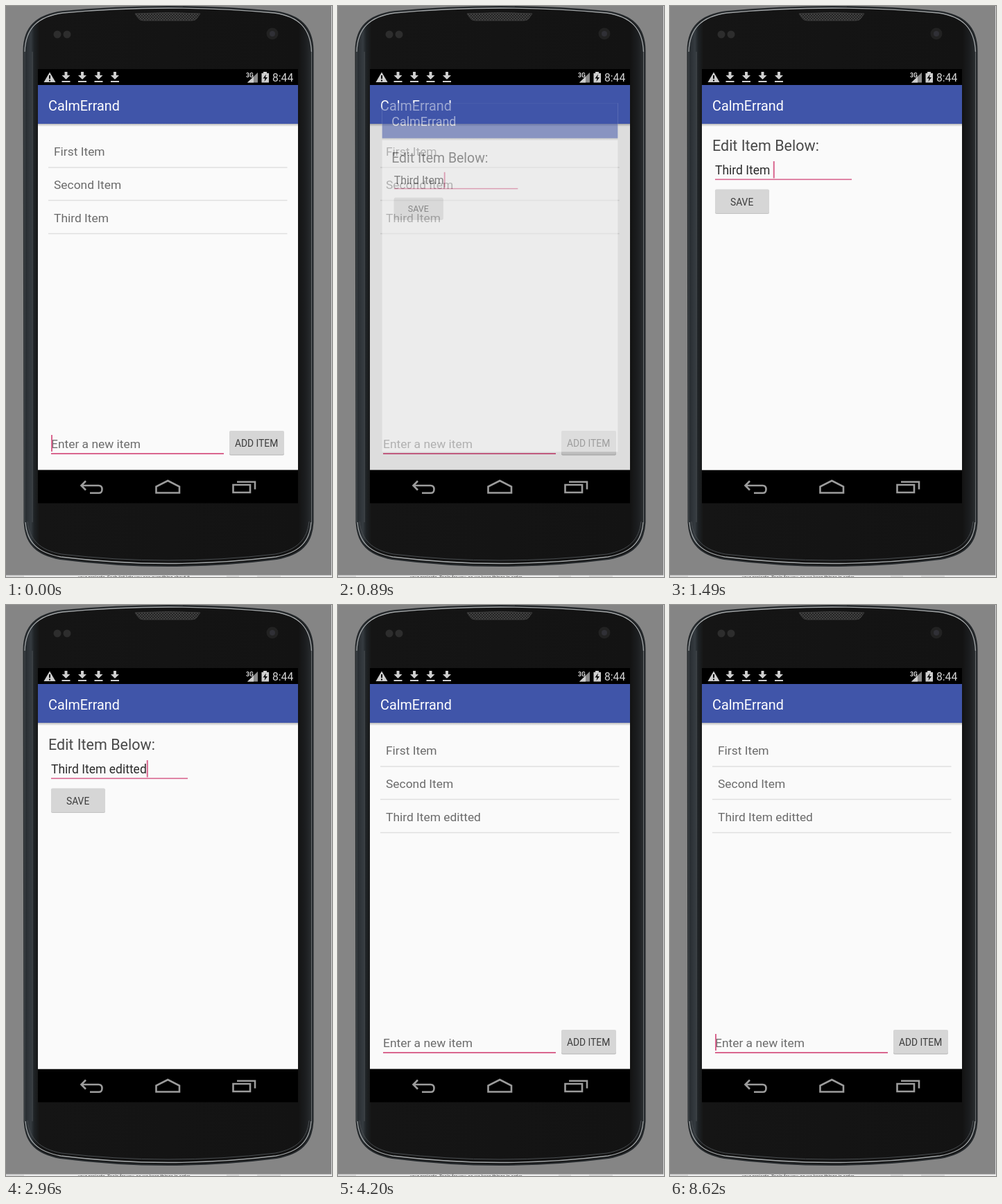
An HTML page for the animation above (8880 ms loop, 470 by 824 pixels).

```html
<!DOCTYPE html>
<html lang="en">
<head>
<meta charset="utf-8">
<title>To-do list</title>
<style>
  html, body { margin: 0; width: 100%; height: 100%; overflow: hidden; background: #858585; }
  svg { display: block; width: 470px; height: 824px; }
  text { font-family: Roboto, sans-serif; white-space: pre; }
  .title { font-size: 19.8px; fill: #fff; }
  .item { font-size: 17.4px; fill: #6b6b6b; }
  .label { font-size: 13.8px; fill: #3c3c3c; }
  .line { stroke: #dfdfdf; stroke-width: 1.4; }
  .pink { fill: #d9668f; }
  .nav { fill: none; stroke: #9c9c9c; stroke-width: 2.6; }
  .icon { fill: #cfcfcf; }
</style>
</head>
<body>
<svg viewBox="0 0 470 824">
  <defs>
    <linearGradient id="shell">
      <stop offset="0" stop-color="#23282c"/>
      <stop offset=".025" stop-color="#353b40"/>
      <stop offset=".036" stop-color="#1f2326"/>
      <stop offset=".055" stop-color="#151515"/>
      <stop offset=".95" stop-color="#131313"/>
      <stop offset=".975" stop-color="#1c1e20"/>
      <stop offset="1" stop-color="#2c3033"/>
    </linearGradient>
    <linearGradient id="shade" x2="0" y2="1">
      <stop offset="0" stop-color="#000" stop-opacity=".26"/>
      <stop offset="1" stop-color="#000" stop-opacity="0"/>
    </linearGradient>
    <pattern id="mesh" width="4" height="4" patternUnits="userSpaceOnUse">
      <path d="M0 0L4 4M4 0L0 4" stroke="#4a4a4a" stroke-width=".8"/>
    </pattern>
    <g id="bar">
      <rect x="46" y="114" width="375" height="56" fill="#4055a9"/>
      <rect x="46" y="170" width="375" height="4" fill="url(#shade)"/>
      <text class="title" x="61" y="150.5">CalmErrand</text>
    </g>
    <path id="load" class="icon" d="M-2 95h4v5h4l-6 6-6-6h4zM-6 108h12v2h-12z"/>
  </defs>

  <rect width="470" height="824" fill="#858585"/>
  <rect x="469" width="1" height="824" fill="#d8d8d8"/>

  <!-- phone -->
  <path d="M25.500 64C26 30 44 13 82 8Q234-6 387 8C424 13 442 30 442.500 64V745C441 776 425 792 390 798Q234 818 78 798C44 792 28 776 26.500 745Z"
    fill="url(#shell)" stroke="#25292c" stroke-width="2"/>
  <g fill="none">
    <path d="M27 66C28 32 46 15 82 10Q234-4 387 10C422 15 439 32 440.500 66" stroke="#a4a8aa" stroke-width="1.3"/>
    <path d="M28 745C30 774 46 789 79 795Q234 814 389 795C422 789 438 774 440 745" stroke="#a4a8aa" stroke-width="1.3"/>
    <path d="M31 744C34 770 48 785 80 791Q234 809 388 791C420 785 434 770 437 744" stroke="#484c4f"/>
    <path d="M38 66V745M27 66V745" stroke="#4a5055"/>
    <path d="M440.500 66V745" stroke="#686c6e"/>
  </g>
  <path id="ear" d="M186 11Q234 8 280 11L275 18Q273 21 268 21H198Q193 21 191 18Z" fill="#232323"/>
  <path d="M186 11Q234 8 280 11L275 18Q273 21 268 21H198Q193 21 191 18Z" fill="url(#mesh)" stroke="#3b3b3b"/>
  <g fill="#2d2d2d">
    <circle cx="74" cy="41" r="5.500"/><circle cx="88" cy="41" r="5.500"/>
    <circle cx="384" cy="40" r="8.500" fill="#222"/><circle cx="384" cy="40" r="4" fill="#303036"/>
  </g>

  <!-- system bars -->
  <rect x="46" y="91" width="375" height="626.500" fill="#000"/>
  <path class="icon" d="M63 95.500L71.500 110H54.500Z"/>
  <path d="M62 100h2v5h-2zM62 106.500h2v2h-2z"/>
  <use href="#load" x="86.500"/><use href="#load" x="110"/><use href="#load" x="133.500"/><use href="#load" x="157"/>
  <path d="M363 96V110.500H348Z" fill="#8c8c8c"/>
  <path class="icon" d="M357 102V110.500H348Z"/>
  <text x="346" y="102.500" font-size="8.500" font-weight="700" fill="#ddd">3G</text>
  <path class="icon" d="M371 95h5v2h3v13.500h-10.500V97h2.500z"/>
  <path d="M375 98.500l-4.500 6h3l-1 4.500 4.500-6h-3z"/>
  <text x="384" y="109" font-size="15.700" fill="#d4d4d4">8:44</text>
  <g class="nav">
    <path d="M115 685.500L108.500 692 115 698.500M109 692H133.500Q138.500 692 138.500 697.500T133.500 702.700H121"/>
    <path d="M216.500 702.500V693.500L233.300 685 250 693.500V702.500Z"/>
    <path d="M327.500 691H352V702H327.500ZM333 686.800H359V697.500"/>
  </g>

  <!-- list page -->
  <rect x="46" y="114" width="375" height="555.500" fill="#fafafa"/>
  <use href="#bar"/>
  <g class="item">
    <text x="69" y="215.500">First Item</text>
    <text x="69" y="263.500">Second Item</text>
    <text id="third" x="69" y="311.500">Third Item</text>
    <text x="65" y="638">Enter a new item</text>
  </g>
  <path class="line" d="M61 233H405.500M61 280.500H405.500M61 328.500H405.500"/>
  <rect class="pink" x="65" y="645" width="249" height="2"/>
  <rect id="listCaret" class="pink" x="65" y="619" width="2" height="24"/>
  <rect x="322" y="614" width="79" height="34.500" rx="2" fill="#c2c2c2"/>
  <rect x="322" y="613" width="79" height="34" rx="2" fill="#d6d6d6"/>
  <text class="label" x="330" y="636">ADD ITEM</text>
  <rect id="dim" x="46" y="170" width="375" height="499.500"/>

  <!-- edit page -->
  <g id="edit">
    <rect x="46" y="114" width="375" height="555.500" fill="#fafafa"/>
    <use href="#bar"/>
    <text x="61" y="208.500" font-size="21.500" fill="#484848">Edit Item Below:</text>
    <text id="field" x="65" y="243" font-size="17.500" fill="#2b2b2b">Third Item</text>
    <rect class="pink" x="65" y="249.500" width="197" height="1.600"/>
    <rect id="editCaret" class="pink" y="224" width="2" height="24.500"/>
    <rect x="65" y="265.500" width="78" height="34.500" rx="2" fill="#c2c2c2"/>
    <rect x="65" y="264.500" width="78" height="34.500" rx="2" fill="#d6d6d6"/>
    <text class="label" x="87" y="287.500">SAVE</text>
  </g>

  <!-- page edge below the phone -->
  <rect y="821.500" width="470" height="3" fill="#ededed"/>
  <path d="M0 823H26M318 823H336M362 823H396" stroke="#c4c4c4"/>
  <text id="foot" x="104" y="826.500" font-size="6.700" fill="#444"></text>
</svg>

<script>
const LOOP = 8880;
const OPEN = 680, CLOSE = 3610, STEPS = 9;
const STEP_MS = { open: 410 / 8, close: 430 / 8 };
const PROGRESS = [0, .08, .2, .32, .43, .53, .68, .82, .93, 1];
const CENTER = [233.5, 391.5];
const TYPED = [[1490, " "], [1800, "e"], [1960, "d"], [2440, "i"], [2553, "t"],
               [2667, "t"], [2780, "e"], [2960, "d"]];
// Each time flips a caret that is on at the start.
const LIST_BLINK = [50, 180, 510, CLOSE, 4200, 4680, 5210, 5630, 6110, 6640, 7130, 7630, 8120, 8620];
const EDIT_BLINK = [1230, 1490, 3450];

const el = id => document.getElementById(id);
const show = (id, on) => el(id).setAttribute("visibility", on ? "inherit" : "hidden");
const isOn = (flips, t) => flips.filter(f => f <= t).length % 2 === 0;

function progress(t, start, ms) {
  if (t < start) return 0;
  return PROGRESS[Math.min(STEPS, 1 + Math.floor((t - start) / ms + 1e-6))];
}

function placeEdit(amount) {
  const [x, y] = CENTER;
  const scale = .8 + .2 * amount;
  el("edit").setAttribute("transform", `translate(${x} ${y}) scale(${scale}) translate(${-x} ${-y})`);
  el("edit").setAttribute("opacity", amount);
  show("edit", amount > 0);
}

function draw(t) {
  const opened = progress(t, OPEN, STEP_MS.open);
  const closed = progress(t, CLOSE, STEP_MS.close);
  placeEdit(opened - closed);
  el("dim").setAttribute("opacity", t < CLOSE ? .22 * opened : 0);

  const added = TYPED.filter(k => k[0] <= t).map(k => k[1]).join("");
  el("field").textContent = "Third Item" + added;
  el("editCaret").setAttribute("x", 65 + el("field").getComputedTextLength());
  show("editCaret", isOn(EDIT_BLINK, t));

  el("third").textContent = t < CLOSE ? "Third Item" : "Third Item editted";
  show("listCaret", isOn(LIST_BLINK, t));
  el("foot").textContent = t < 400
    ? "your projects. Each list lets you see everything about it"
    : "your projects. Tools for you, so we keep things in order";
}

const begin = performance.now();
function tick() {
  draw((performance.now() - begin) % LOOP);
  requestAnimationFrame(tick);
}
tick();
</script>
</body>
</html>
```
